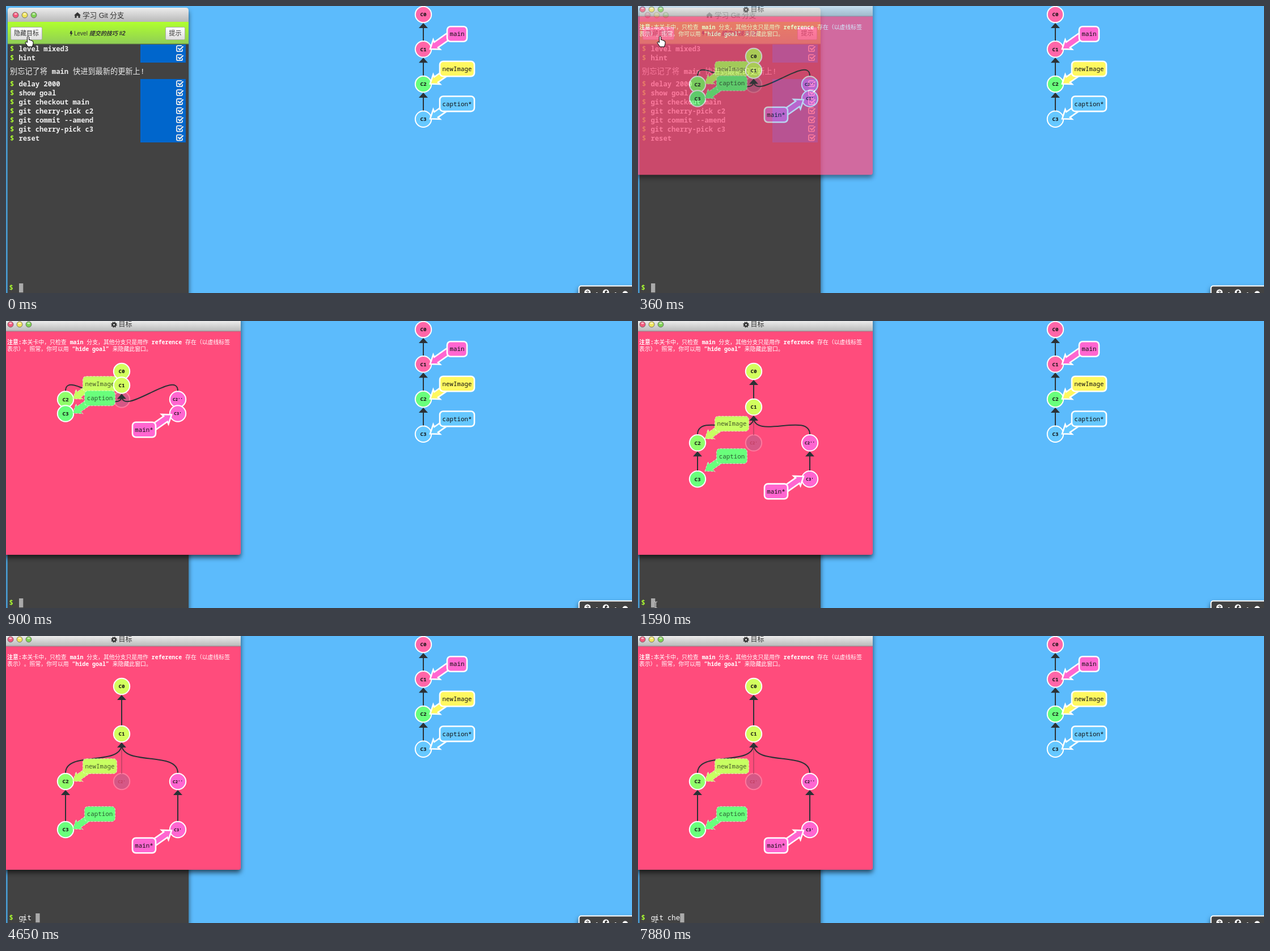
Recreate the animation shown at these times as an HTML page. Size 1104 by 507 pixels, loop 8000 ms.

```html
<!DOCTYPE html>
<html lang="zh">
<head>
<meta charset="utf-8">
<style>
html, body { margin: 0; width: 100%; height: 100%; overflow: hidden; background: #5cbbfc; }
svg { display: block; width: 1104px; height: 507px; }
text { white-space: pre; font-kerning: none; text-spacing-trim: space-all; }
.mono { font-family: "Noto Sans Mono", "Noto Sans CJK SC", monospace; }
.sans { font-family: "Liberation Sans", "Noto Sans CJK SC", sans-serif; fill: #333; }
.bold { font-weight: 700; }
.shadow { filter: drop-shadow(0 5px 4px rgba(0,0,0,.6)); }
</style>
</head>
<body>
<svg id="stage" viewBox="0 0 1104 507">
  <defs>
    <linearGradient id="bar" x2="0" y2="1"><stop stop-color="#ececec"/><stop offset="1" stop-color="#b9b9b9"/></linearGradient>
    <linearGradient id="level" x2="0" y2="1"><stop stop-color="#b0ff2e"/><stop offset="1" stop-color="#8fce56"/></linearGradient>
    <linearGradient id="button" x2="0" y2="1"><stop stop-color="#fff"/><stop offset="1" stop-color="#dedede"/></linearGradient>
  </defs>
  <g id="tree"></g>
  <g id="terminal"></g>
  <g id="goal"></g>
  <g id="tools"></g>
  <g id="mouse">
    <path id="hand" fill="#fff" stroke="#000" d="M-1.500 10V1.500Q0-.8 1.500 1.500V7Q4 5.500 4.500 8Q6.500 6.500 7 9Q9 8 9 11V14Q8 16 7.500 19H-.5Q-2 16-5 12Q-5 9-1.500 11.500Z"/>
    <path id="arrow" fill="#fff" stroke="#000" d="M0 0V16L4 12.500L7 18.500L9.500 17.500L6.500 11.500H11.500Z"/>
    <path id="beam" fill="none" stroke="#ddd" d="M-2.500-5.500H-.8L0-4.500L.8-5.500H2.500M0-4.500V4.500M-2.500 5.500H-.8L0 4.500L.8 5.500H2.500"/>
  </g>
</svg>
<script>
const $ = id => document.getElementById(id);
const LOOP = 8000;
const PINK = '#ff66a8', MAGENTA = '#ff66d0', GREEN = '#69ff7c', SKY = '#66c8ff', LIME = '#d2ff5e';
const INK = '#2b3135';

const rect = (x, y, w, h, fill, extra = '') =>
  `<rect x="${x}" y="${y}" width="${w}" height="${h}" fill="${fill}" ${extra}/>`;
const text = (x, y, size, str, cls, extra = '') =>
  `<text x="${x}" y="${y + size * 0.36}" font-size="${size}" class="${cls}" ${extra}>${str}</text>`;
const MID = 'text-anchor="middle"';

function lights(x, y) {
  return ['#f4577c', '#f0e45a', '#7fd253'].map((c, i) =>
    `<circle cx="${x + i * 16}" cy="${y}" r="5" fill="${c}" stroke="#555" stroke-opacity=".75"/>
     <ellipse cx="${x + i * 16}" cy="${y - 2}" rx="2.500" ry="1.500" fill="#fff" opacity=".6"/>`).join('');
}

function commit(name, x, y, fill, id = '') {
  const size = name.length > 2 ? 7.6 : 9.4;
  return `<g id="${id}" transform="translate(${x} ${y})">
    <circle r="14.2" fill="${fill}" stroke="#fff" stroke-width="2"/>
    ${text(0, 0, size, name, 'mono bold', MID + ' fill="#111"')}</g>`;
}

// A label with its pointer; the origin is the pointer's tip.
function branch(name, x, y, w, fill, { id = '', flip = false, faint = false } = {}) {
  const cx = flip ? -48.5 : 47.5, cy = flip ? 26.5 : -26.5;
  const line = faint
    ? 'stroke="#fff" stroke-opacity=".4" stroke-width="1.500" stroke-dasharray="4 2"'
    : 'stroke="#fff" stroke-width="2.600"';
  return `<g id="${id}" transform="translate(${x} ${y})">
    <path d="M0 0L14-10.500L13-5.800H40V5.800H13L14 10.500Z" transform="rotate(${flip ? 145 : -35})" fill="${fill}" ${line}/>
    ${rect(cx - w / 2, cy - 13.3, w, 26.6, fill, `rx="6" ${line}`)}
    ${text(cx, cy, 10.8, name, 'mono', MID + ` fill="#111" opacity="${faint ? .7 : 1}"`)}</g>`;
}

const head = (x, y) => `M${x} ${y}L${x + 8} ${y + 9}H${x - 8}Z`;
const link = (x, top, bottom) => `M${x} ${top + 22}V${bottom - 14}`;
const curve = (x, top, bottom) =>
  `M${x} ${bottom - 15}C${x} ${bottom - 55} 204 ${top + 58} 204 ${top + 18}`;

function drawTree() {
  const ys = [15, 76.3, 138, 199.7], fills = [PINK, PINK, GREEN, SKY];
  let out = '';
  for (let i = 0; i < 3; i++)
    out += `<path d="${link(736, ys[i], ys[i + 1])}" stroke="${INK}" stroke-width="2"/>
            <path d="${head(736, ys[i] + 15)}" fill="${INK}"/>`;
  ys.forEach((y, i) => out += commit('C' + i, 736, y, fills[i]));
  out += branch('main', 748, 76, 35, MAGENTA);
  out += branch('newImage', 748, 137.5, 61, '#fff860');
  out += branch('caption*', 748, 199.3, 61, SKY);
  $('tree').innerHTML = out;
}

function drawTerminal() {
  const button = (x, w, s) => rect(x + .5, 37.5, w, 22, 'url(#button)', 'rx="2" stroke="#aaa"') +
    text(x + w / 2 + .5, 48.5, 11, s, 'sans', MID);
  const check = y =>
    `<path d="M310 ${y - 5}H303Q301 ${y - 5} 301 ${y - 3}V${y + 3}Q301 ${y + 5} 303 ${y + 5}H309Q311 ${y + 5} 311 ${y + 3}V${y + 1}"
      fill="none" stroke="#eee" stroke-width="1.800"/>
     <path d="M303.500 ${y - 1}l3 3l6-6" fill="none" stroke="#eee" stroke-width="2.300"/>`;
  const row = (y, s) => text(7, y, 12.2, '$', 'mono bold', 'fill="#adff2f"') +
    text(22.5, y, 12.2, s, 'mono bold', 'fill="#eee"') + check(y - .8);
  const cmds = ['delay 2000', 'show goal', 'git checkout main', 'git cherry-pick c2',
    'git commit --amend', 'git cherry-pick c3', 'reset'];
  $('terminal').innerHTML =
    rect(3, 3, 319, 520, '#424242', 'rx="6" class="shadow"') +
    '<path d="M3 28V8Q3 3 8 3H317Q322 3 322 8V28Z" fill="url(#bar)"/>' + lights(17, 16) +
    '<path d="M120 16.500L126 11L132 16.500H130.500V21H127.500V17.500H124.500V21H121.500V16.500Z" fill="#333"/>' +
    text(135, 16, 12.6, '学习 Git 分支', 'sans') +
    rect(3, 28, 319, 39, 'url(#level)') + rect(3, 66.5, 319, 1, '#6c8f42') +
    button(8, 55, '隐藏目标') + button(281, 34, '提示') +
    '<path d="M114 44H116.500L115.500 47H117.500L114 54L114.500 49H112.500Z" fill="#333"/>' +
    text(120, 48.5, 10, 'Level <tspan font-style="italic" font-weight="700">提交的技巧 #2</tspan>', 'sans') +
    rect(237, 68, 80, 32, '#0066cc') + rect(237, 129, 80, 112, '#0066cc') +
    row(76, 'level mixed3') + row(92, 'hint') +
    text(7, 115, 13.2, '别忘记了将 <tspan font-size="12.2" font-weight="700">main</tspan> 快进到最新的更新上!', 'mono', 'fill="#eee"') +
    cmds.map((s, i) => row(138 + i * 15.9, s)).join('') +
    text(5.5, 498, 12.2, '$', 'mono bold', 'fill="#adff2f"') +
    text(22.8, 498, 12.2, '', 'mono', 'id="typed" fill="#fff"') +
    rect(23, 490, 7.3, 16, '#aaa', 'id="caret"');
}

function drawGoal() {
  const edge = id => `<path id="${id}" fill="none" stroke="${INK}" stroke-width="2"/>`;
  const strong = s => `<tspan class="bold">${s}</tspan>`;
  $('goal').innerHTML =
    rect(-4, -10, 418, 423, '#ff4c7c', 'rx="4" id="panel" class="shadow"') +
    rect(0, 0, 414, 18, 'url(#bar)') + rect(0, 17.5, 414, 1, '#8a8a8a') + lights(8, 6) +
    '<circle cx="190.500" cy="6.500" r="2.800" fill="none" stroke="#333" stroke-width="2.400"/>' +
    '<circle cx="190.500" cy="6.500" r="4.500" fill="none" stroke="#333" stroke-width="1.600" stroke-dasharray="1.770"/>' +
    text(198.5, 6, 12, '目标', 'sans') +
    text(2, 37, 9.9, `${strong('注意:')}本关卡中，只检查 ${strong('main')} 分支，其他分支只是用作 ${strong('reference')} 存在（以虚线标签`, 'mono', 'fill="#fff"') +
    text(2, 49, 9.9, `表示）。照常，你可以用 ${strong('“hide goal”')} 来隐藏此窗口。`, 'mono', 'fill="#fff"') +
    '<g id="graph">' +
    `<g opacity=".25">${commit("C2'", 204, 0, '#5a7fa5', 'ghost')}<path id="ghostLink" stroke="${INK}" stroke-width="2"/></g>` +
    edge('links') + edge('curves') + `<path id="heads" fill="${INK}"/>` +
    commit('C2', 105, 0, '#8fff6a', 'c2') + commit('C3', 105, 0, GREEN, 'c3') +
    commit("C2''", 303, 0, MAGENTA, 'c2b') + commit("C3'", 303, 0, MAGENTA, 'c3b') +
    branch('newImage', 118, 0, 60, '#c8ff62', { id: 'newImage', faint: true }) +
    branch('caption', 118, 0, 54, GREEN, { id: 'caption', faint: true }) +
    branch('main*', 292, 0, 41, MAGENTA, { id: 'mainTip', flip: true }) +
    commit('C0', 204, 89, LIME) + commit('C1', 204, 0, LIME, 'c1') + '</g>';
}

function drawTools() {
  const dot = (x, y, r) => `<circle cx="${x}" cy="${y}" r="${r}" fill="#fff"/>`;
  $('tools').innerHTML =
    rect(1010.5, 494.5, 110, 40, '#424242', 'rx="4" stroke="#fff" stroke-width="2" class="shadow"') +
    dot(1025.5, 506, 5.5) + text(1025.5, 506, 9, '?', 'sans bold', MID) +
    dot(1042, 507.5, 1.5) + dot(1058, 506, 5.5) +
    '<path d="M1056 507V504L1059 502L1061 505L1058 507Z" fill="#424242"/>' +
    dot(1075, 507.5, 1.5) + dot(1092, 508.5, 5);
}

const clamp = v => Math.min(1, Math.max(0, v));
const mix = (a, b, k) => a + (b - a) * k;
const easeOut = k => 1 - (1 - k) ** 2;
const place = (id, x, y) => $(id).setAttribute('transform', `translate(${x} ${y})`);
const show = (id, on) => $(id).setAttribute('display', on ? 'inline' : 'none');

function updateGoal(t) {
  show('goal', t >= 50);
  $('goal').setAttribute('opacity', clamp((t - 50) / 430));
  $('graph').setAttribute('opacity', clamp((t - 130) / 220));
  $('panel').setAttribute('height', mix(193, 423, clamp((t - 50) / 620)));

  // The labels set off a little after the commits.
  const unfold = (from, to, delay = 0) => mix(from, to, easeOut(clamp((t - 1412 - delay) / 440)));
  const y1 = unfold(113.5, 173), y2 = unfold(138.5, 257), y3 = unfold(163.5, 342);
  place('c1', 204, y1);
  place('ghost', 204, y2);
  place('c2', 105, y2);
  place('c2b', 303, y2);
  place('c3', 105, y3);
  place('c3b', 303, y3);
  place('newImage', 118, unfold(137.5, 256.5, 20));
  place('caption', 118, unfold(163, 341, 26));
  place('mainTip', 292, unfold(165.5, 343.5, 13));

  const apart = y1 - 89 > 40;
  $('links').setAttribute('d', apart ? link(204, 89, y1) + link(105, y2, y3) + link(303, y2, y3) : '');
  $('ghostLink').setAttribute('d', apart ? link(204, y1, y2) : '');
  $('curves').setAttribute('d', curve(105, y1, y2) + curve(303, y1, y2));
  $('heads').setAttribute('d', head(204, y1 + 15) +
    (apart ? head(204, 104) + head(105, y2 + 15) + head(303, y2 + 15) : ''));
}

const KEYS = [[3290, 'g'], [4240, 'gi'], [4370, 'git'], [4650, 'git '], [7710, 'git ch'], [7880, 'git che']];
function updatePrompt(t) {
  const typed = KEYS.reduce((s, [at, str]) => t >= at ? str : s, '');
  $('typed').textContent = typed;
  $('caret').setAttribute('x', 23 + typed.length * 7.32);
}

function updateMouse(t) {
  show('hand', t < 430);
  show('arrow', t >= 430 && t < 900);
  show('beam', t >= 1430);
  if (t < 670) {
    const k = clamp((t - 400) / 270);
    place('mouse', mix(39, 82, k), mix(53, 269, k));
  } else if (t < 830) place('mouse', 82, 269);
  else if (t < 900) place('mouse', 24, 470);
  else place('mouse', 31.5, 501.5);
}

function render(t) {
  updateGoal(t);
  updatePrompt(t);
  updateMouse(t);
}

drawTree();
drawTerminal();
drawGoal();
drawTools();
const start = performance.now();
function tick() {
  render((performance.now() - start) % LOOP);
  requestAnimationFrame(tick);
}
tick();
</script>
</body>
</html>
```
